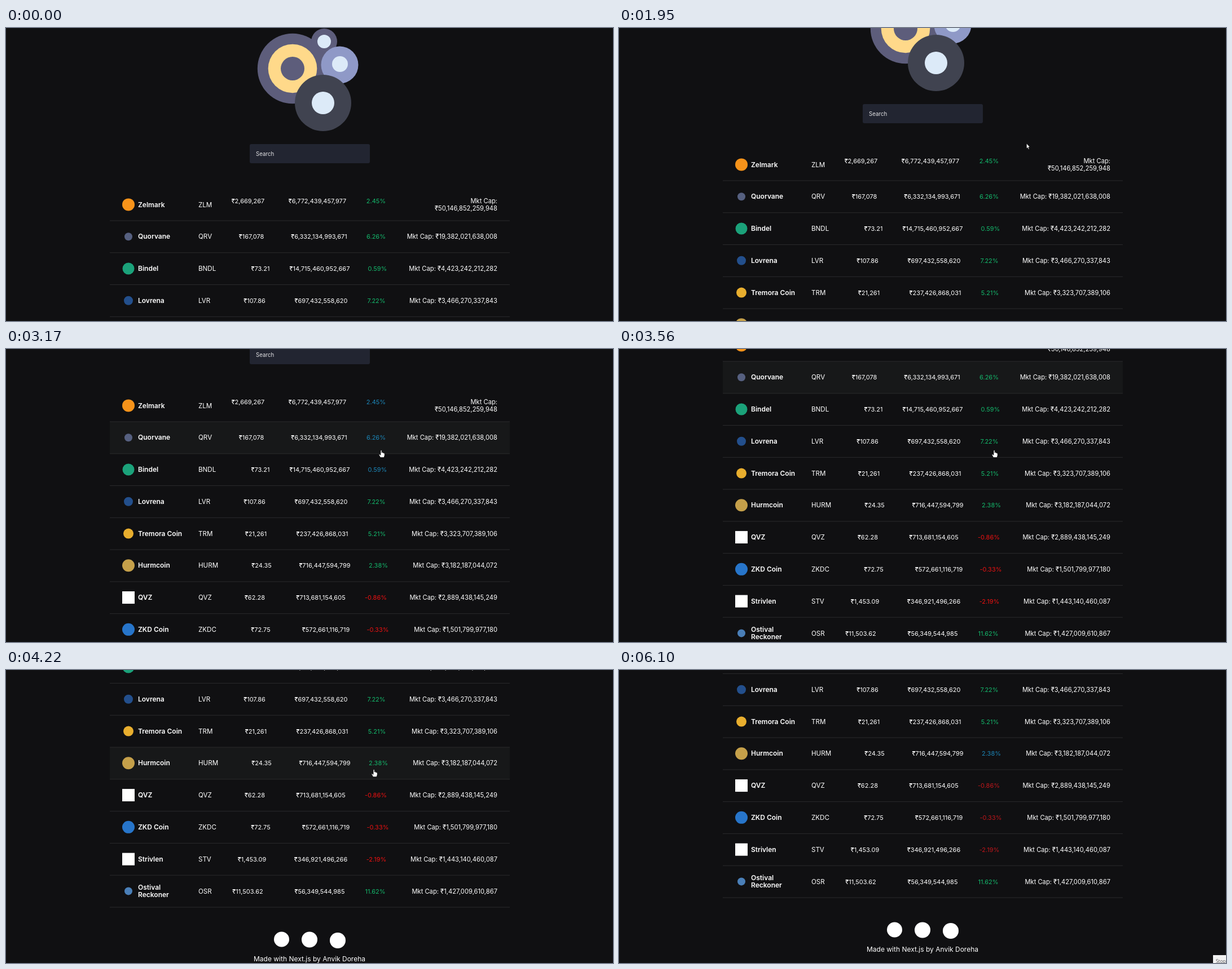
Animation of 1076 by 520 pixels, one loop 6.17 s. Source, as an HTML page:

```html
<!DOCTYPE html>
<html lang="en">
<head>
<meta charset="utf-8">
<title>Coin prices</title>
<style>
  html, body { margin: 0; width: 100%; height: 100%; overflow: hidden; background: #101012; }
  svg { display: block; }
  text { font: 11px Inter, sans-serif; fill: #fff; }
  .name { font-size: 12px; font-weight: 600; }
  .symbol { font-size: 11.6px; }
  .cap { font-size: 11.2px; }
  .search { font-size: 9.7px; fill: #e4e4e6; }
  .footer { font-size: 12px; }
  .tip { font: 8.3px "Open Sans", sans-serif; fill: #555; }
</style>
</head>
<body>
<svg id="stage" width="1076" height="520" viewBox="0 0 1076 520">
  <g id="page"></g>
  <g id="tip">
    <rect x="1053" y="506" width="23" height="14" fill="#f1f1f1"/>
    <text class="tip" x="1058" y="519.5">Stop</text>
  </g>
  <g id="cursor" stroke="#000" stroke-width=".7" fill="#fff">
    <path id="arrow" d="M0 0V9.2L2 7.4L3.5 10.7L5 10L3.6 6.8H6.4Z"/>
    <path id="hand" d="M-1 0Q.2-1 1.2 0V4Q2-.1 3 4.3Q4.2 3.6 4.7 4.8Q6.2 4.4 6.2 6V9L5 12.6H-1.2L-4 8Q-4.3 6.4-2.8 6.8L-1 8.3Z"/>
  </g>
</svg>
<script>
const LOOP = 6170, TOP = 285.2, PITCH = 56.78;
const $ = id => document.getElementById(id);
const page = $('page');

function add(tag, attrs, content = '') {
  const el = document.createElementNS('http://www.w3.org/2000/svg', tag);
  for (const key in attrs) el.setAttribute(key, attrs[key]);
  el.textContent = content;
  return page.appendChild(el);
}
const circle = (cx, cy, r, fill) => add('circle', { cx, cy, r, fill });
const rect = (x, y, width, height, fill, rx = 0) => add('rect', { x, y, width, height, fill, rx });
const label = (x, middle, content, anchor = 'start', cls = '') =>
  add('text', { x, y: middle + 4.1, 'text-anchor': anchor, class: cls }, content);

// name, symbol, price, volume, change, market cap, column centres, icon colour, radius, square
const coins = [
  ['Zelmark', 'ZLM', '2,669,267', '6,772,439,457,977', 2.45, '50,146,852,259,948', [429, 552, 656], '#f7931a', 11],
  ['Quorvane', 'QRV', '167,078', '6,332,134,993,671', 6.26, '19,382,021,638,008', [435, 555, 656], '#566080', 7],
  ['Bindel', 'BNDL', '73.21', '14,715,460,952,667', 0.59, '4,423,242,212,282', [451, 556, 658.5], '#1ba27a', 10.5],
  ['Lovrena', 'LVR', '107.86', '697,432,558,620', 7.22, '3,466,270,337,843', [440.5, 558.5, 656.5], '#234f8c', 8],
  ['Tremora Coin', 'TRM', '21,261', '237,426,868,031', 5.21, '3,323,707,389,106', [443, 560.5, 657.5], '#e8ae2e', 9],
  ['Hurmcoin', 'HURM', '24.35', '716,447,594,799', 2.38, '3,182,187,044,072', [453, 565, 660], '#c5a04a', 11],
  ['QVZ', 'QVZ', '62.28', '713,681,154,605', -0.86, '2,889,438,145,249', [441, 558, 655.5], '#fff', 11, true],
  ['ZKD Coin', 'ZKDC', '72.75', '572,661,116,719', -0.33, '1,501,799,977,180', [451.5, 567, 659], '#2775ca', 11],
  ['Strivlen', 'STV', '1,453.09', '346,921,496,266', -2.19, '1,443,140,460,087', [436, 558, 656.5], '#fff', 11, true],
  ['Ostival Reckoner', 'OSR', '11,503.62', '56,349,544,985', 11.62, '1,427,009,610,867', [428.5, 556, 654.5], '#4a7fb8', 7]
];

// Coin illustration and search box
circle(508, 72, 62.2, '#5d5d7b');
circle(508, 72, 43.3, '#ffd98a');
circle(508, 72, 21, '#5d5d7b');
circle(564, 24, 23, '#5d5d7b');
circle(564, 24, 12, '#dceaf8');
circle(591.5, 65.5, 33, '#8f99c7');
circle(592, 64, 14, '#dceaf8');
circle(562, 133, 50, '#404350');
circle(562, 133, 20, '#dceaf8');
rect(432, 206, 213, 34, '#222531', 3);
label(443, 222.7, 'Search', 'start', 'search');

const highlight = rect(184, 0, 709, PITCH, '#171819');
const changes = coins.map(([name, symbol, price, volume, change, cap, columns, colour, r, square], i) => {
  const y = TOP + PITCH * i + 28.2;
  const upper = i ? y : y - 7;
  if (square) rect(217 - r, y - r, 2 * r, 2 * r, colour);
  else circle(217, y, r, colour);
  const lines = i === 9 ? name.split(' ') : [name];
  lines.forEach((line, n) => label(234, y + (n - (lines.length - 1) / 2) * 13.5, line, 'start', 'name'));
  label(341, y, symbol, 'start', 'symbol');
  label(columns[0], upper, '₹' + price, 'middle');
  label(columns[1], upper, '₹' + volume, 'middle');
  if (i) label(871, y, 'Mkt Cap: ₹' + cap, 'end', 'cap');
  else {
    label(871, y - 7, 'Mkt Cap:', 'end', 'cap');
    label(871, y + 6.8, '₹' + cap, 'end', 'cap');
  }
  rect(184, TOP + PITCH * (i + 1) - .5, 709, 1, '#2a2a2c');
  return label(columns[2], upper, change.toFixed(2) + '%', 'middle');
});

circle(488.5, 910, 13.5, '#fff');
circle(538, 910.5, 14, '#fff');
circle(588, 912, 14, '#fff');
label(538, 944.5, 'Made with Next.js by Anvik Doreha', 'middle', 'footer');

// Wheel steps: start, end, distance
const wheel = [[1468, 1590, 71], [2190, 2310, 71], [2830, 2970, 71], [3470, 3650, 142], [3820, 3960, 71], [4206, 4310, 23]];
// Pointer: time, x, y
const path = [
  [300, 1080, 524], [480, 930, 360], [640, 790, 235], [760, 735, 201], [840, 729, 208],
  [1890, 729, 208], [2180, 697, 193], [2570, 697, 193], [2660, 665, 180], [3820, 665, 180],
  [4220, 652, 177], [4430, 653, 188], [5060, 660, 326], [5090, 660, 326], [5540, 1048, 524]
];
// Highlighted row: time, index
const hover = [[0, -1], [2600, 0], [3060, 1], [3640, 4], [4000, 5], [4400, 6], [4670, 7], [4900, 8], [5140, 9], [5270, -1]];

const clamp = v => Math.min(1, Math.max(0, v));

function scrollAt(t) {
  return wheel.reduce((sum, [from, to, distance]) => {
    const rest = 1 - clamp((t - from) / (to - from));
    return sum + distance * (1 - rest * rest);
  }, 0);
}

function pointerAt(t) {
  const n = path.findIndex(key => key[0] > t);
  if (n < 1) return [1100, 540];
  const [t0, x0, y0] = path[n - 1], [t1, x1, y1] = path[n];
  const u = (t - t0) / (t1 - t0);
  return [x0 + (x1 - x0) * u, y0 + (y1 - y0) * u];
}

function changeColour(i, t) {
  if (coins[i][4] < 0) return t > 4430 + 230 * (i - 5) ? '#c0161b' : '#ee1111';
  const blue = i < 3 ? t >= 2830 && t < 3470 : i === 5 && t > 4420;
  return blue ? '#1c86b8' : '#14b96c';
}

function draw(now) {
  const t = now % LOOP;
  page.setAttribute('transform', `translate(0 ${-Math.round(scrollAt(t))})`);
  const [x, y] = pointerAt(t);
  $('cursor').setAttribute('transform', `translate(${x.toFixed(1)} ${y.toFixed(1)})`);
  const row = hover.findLast(key => key[0] <= t)[1];
  highlight.setAttribute('y', TOP + PITCH * row);
  highlight.style.display = row < 0 ? 'none' : '';
  $('hand').style.display = row < 0 ? 'none' : '';
  $('arrow').style.display = row < 0 ? '' : 'none';
  changes.forEach((el, i) => el.style.fill = changeColour(i, t));
  $('tip').style.opacity = clamp((t - 5820) / 260);
  requestAnimationFrame(draw);
}
requestAnimationFrame(draw);
</script>
</body>
</html>
```
